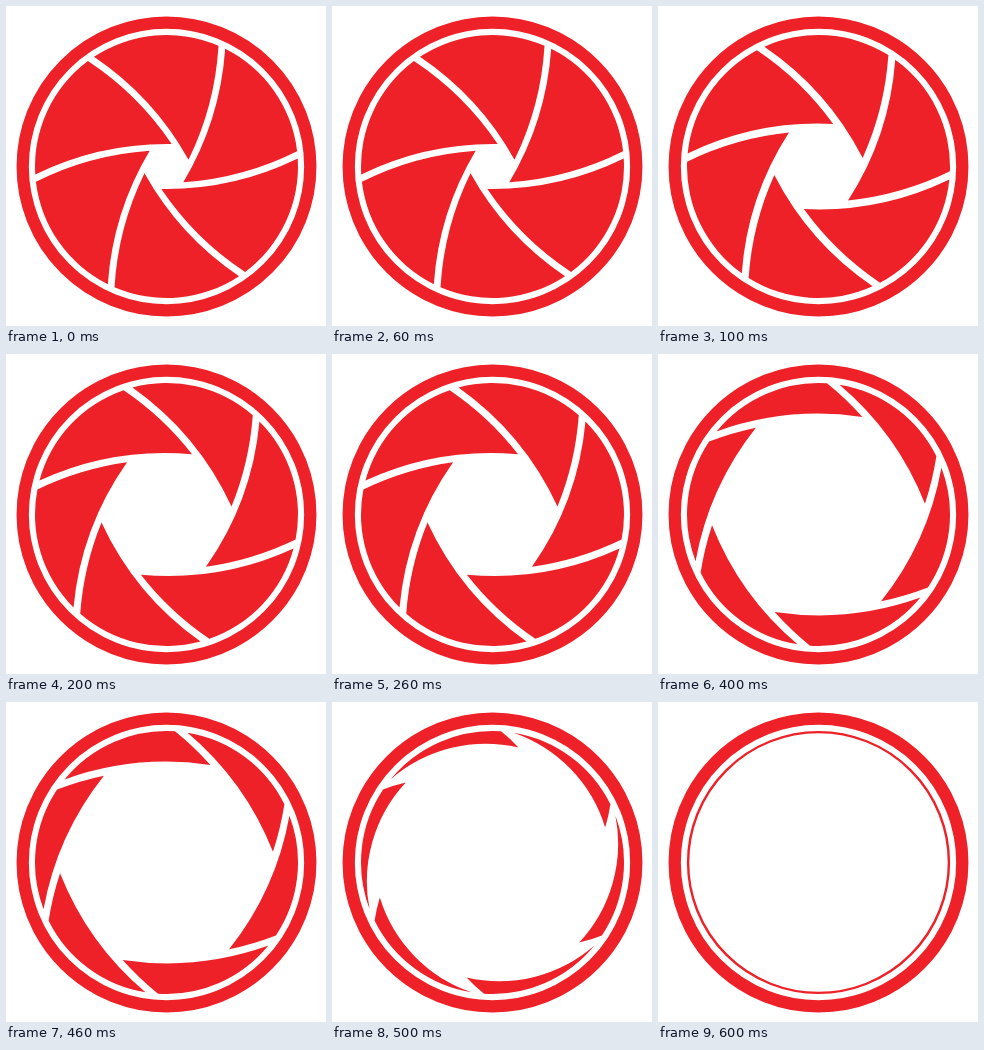
Animation of 320x320 px, one loop 700 ms. Source, as an HTML page:

```html
<!DOCTYPE html>
<html lang="en">
<head>
<meta charset="utf-8">
<title>Aperture</title>
<style>
  html, body { margin: 0; width: 100%; height: 100%; overflow: hidden; background: #fff; }
  svg { display: block; width: 100vw; height: 100vh; }
</style>
</head>
<body>
<svg viewBox="0 0 320 320">
  <g transform="translate(160.5 160.5)" fill="none" stroke="#ed2127">
    <circle r="143.8" stroke-width="12.3"/>
    <circle id="rim" r="130.4" stroke-width="2.4"/>
    <path id="blades" fill="#ed2127" stroke="none"/>
  </g>
</svg>
<script>
const STEP = 100;
const RIM = 131.5;
const BLADES = 6;

// Angles in degrees: blade start and gap on the rim, polar tip, edge radius.
const poses = [
  { start: -63.5, gap: 3.2, tipR: 23, tip: 43, bend: 300 },
  { start: -54.3, gap: 3.6, tipR: 45, tip: 49, bend: 300 },
  { start: -45, gap: 4, tipR: 65.5, tip: 53, bend: 300 },
  { start: -33, gap: 4.5, tipR: 86, tip: 54, bend: 300 },
  { start: -20.8, gap: 5.5, tipR: 107, tip: 54.2, bend: 300 },
  { start: -20.8, gap: 5.5, tipR: 118, tip: 42.7, bend: 145 },
  null // fully open: only the thin rim is left
];

const rim = document.getElementById('rim');
const blades = document.getElementById('blades');

function polar(radius, degrees) {
  const a = degrees * Math.PI / 180;
  return `${(radius * Math.cos(a)).toFixed(2)} ${(radius * Math.sin(a)).toFixed(2)}`;
}

const arc = (radius, sweep, point) => `A${radius} ${radius} 0 0 ${sweep} ${point}`;

function blade({ start, gap, tipR, tip, bend }, turn) {
  const from = polar(RIM, start + turn);
  const to = polar(RIM, start + turn + 360 / BLADES - gap);
  return `M${from}` + arc(bend, 1, polar(tipR, tip + turn)) +
    arc(bend, 0, to) + arc(RIM, 0, from) + 'Z';
}

function draw(ms) {
  const pose = poses[Math.floor(ms / STEP) % poses.length];
  rim.style.display = pose ? 'none' : '';
  let path = '';
  for (let i = 0; pose && i < BLADES; i++) path += blade(pose, i * 360 / BLADES);
  blades.setAttribute('d', path);
}

const began = performance.now();
function tick() {
  draw(performance.now() - began);
  requestAnimationFrame(tick);
}
tick();
</script>
</body>
</html>
```
